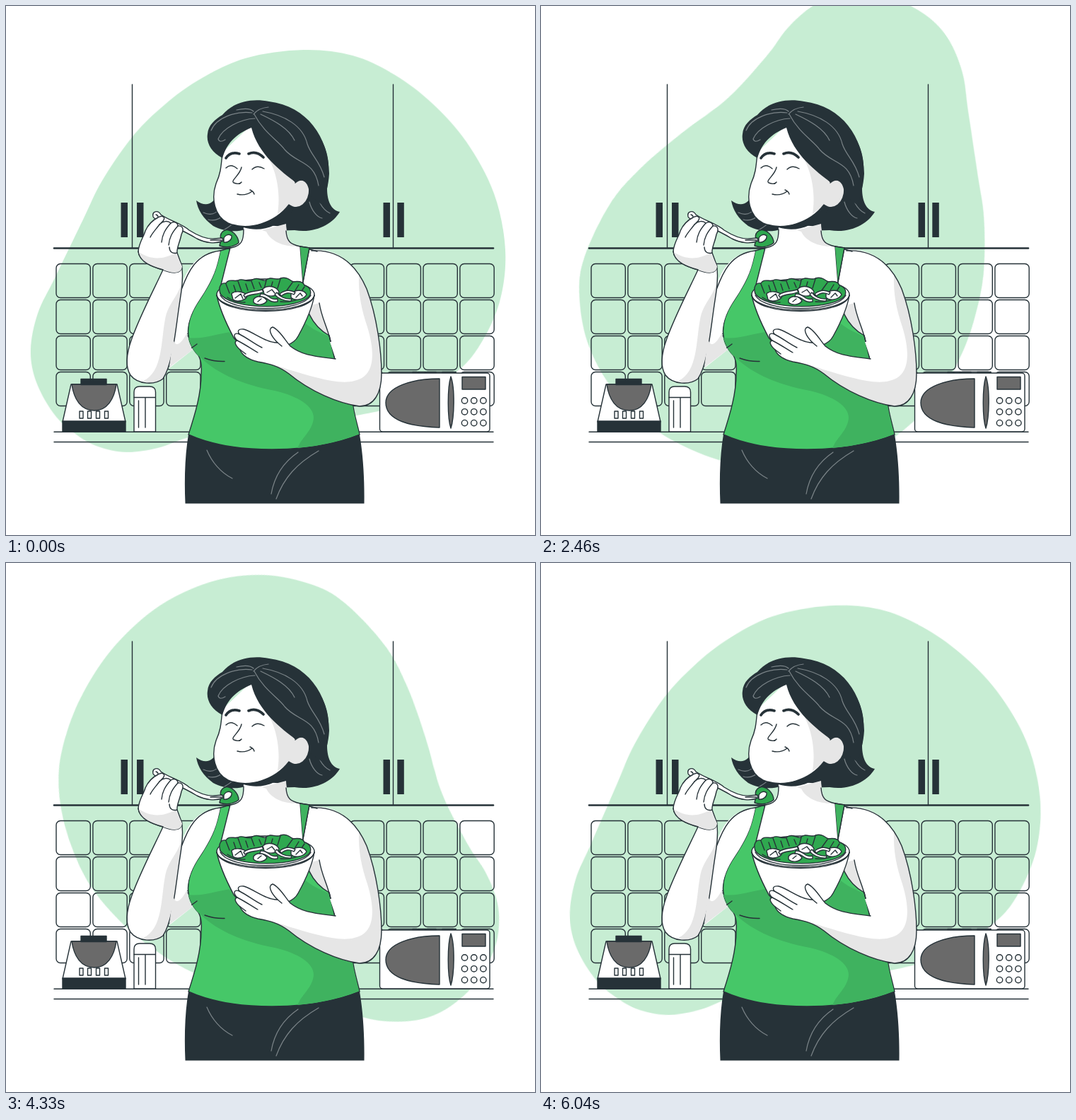
An HTML page for the animation above (6080 ms loop, 748 by 748 pixels).

```html
<!DOCTYPE html>
<html lang="en">
<head>
<meta charset="utf-8">
<title>Kitchen salad</title>
<style>
  html, body { margin: 0; width: 100%; height: 100%; overflow: hidden; background: #fff; }
  svg { display: block; width: 100vw; height: 100vh; }
  #blob { fill: #c7edd3; transform-origin: 373px 349px; animation: spin 6080ms linear infinite; }
  @keyframes spin { to { transform: rotate(360deg); } }
  .ink { stroke: #263238; stroke-width: 1.4; stroke-linecap: round; stroke-linejoin: round; }
  .line { fill: none; }
  .white { fill: #fff; }
  .dark { fill: #263238; }
  .gray { fill: #6a6a6a; }
  .shade { fill: #e6e6e6; }
  .green { fill: #46c768; }
  .deep { fill: #3fb25f; }
  .leaf { fill: #2fa84f; }
  .strand { fill: none; stroke: #7b8488; stroke-width: 1.2; stroke-linecap: round; }
</style>
</head>
<body>
<svg viewBox="0 0 748 748">
  <path id="blob"/>

  <!-- kitchen -->
  <g id="tiles" class="ink line"></g>
  <g class="ink line">
    <path d="M178.5 111V342M547.5 111V342M68 602.3H689M68 616.5H689"/>
    <path d="M68 342.5H689" stroke-width="2.6" style="stroke-width:2.6"/>
  </g>
  <path class="dark" d="M162.5 278h9.5v49h-9.5zM185 278h9.5v49H185zM533.5 278h9.5v49h-9.5zM553.3 278h9.5v49h-9.5z"/>

  <g class="ink">
    <path class="white" d="M92 535H157L169 588H80Z"/>
    <path class="gray" d="M93 535H156C153 556 143 572 125 572C106 572 96 556 93 535Z"/>
    <path class="dark" d="M106 527.5H142V535.5H106ZM80 587H169V602H80Z"/>
    <path class="white" d="M104 573h5v10h-5zM115.500 573h5v10h-5zM127.500 573h5v10h-5zM139.500 573h5v10h-5z"/>
    <path class="white" d="M181 602V546Q181 538 189 538H203Q211.500 538 211.500 546V602Z"/>
    <path class="line" d="M181 553.5H211M187.500 558V596M197 554V596"/>
    <rect class="white" x="528.5" y="519" width="155.500" height="83" rx="4"/>
    <path class="line" d="M575 517.7H608M617 517.7H636" style="stroke-width:2"/>
    <path class="gray" d="M613 527V596C572 595 537 586 537 561C537 538 575 527 613 527Z"/>
    <path class="gray" d="M629 524C635 540 634 582 629 597C624 582 624 540 629 524Z"/>
    <path class="gray" d="M645 524.500H678V542H645Z"/>
    <g id="knobs" class="white"></g>
  </g>

  <!-- hair behind -->
  <path class="dark" d="M269 275C281 284 294 282 299 264L335 300L338 316C326 320 308 319 293 311C279 301 271 288 269 275Z"/>
  <path class="dark" d="M350 250L440 180C462 210 456 240 454 258C454 276 460 289 472 291C462 308 438 322 408 317L340 319Z"/>
  <path class="strand" d="M279 292C290 297 298 293 303 285M286 302C296 305 304 300 310 294M309 316C314 313 318 311 321 307"/>
  <path class="strand" d="M429 277C432 289 440 299 447 300M437 256C439 273 447 288 458 293"/>

  <!-- torso -->
  <path class="white" d="M336 308C336 332 332 341 303 346L290 420L300 470H440L466 505L505 564L531 520C531 490 525 440 510 400C495 365 470 342 430 344L415 340C402 337 398 333 396 312Z"/>
  <path class="shade" d="M362 317L396 308C397 333 402 338 415 340C395 341 375 334 368 319Z"/>
  <path class="shade" d="M425 425L443 420C447 440 455 453 457 468C444 462 432 452 422 440Z"/>
  <path class="ink line" d="M336 316C336 332 333 339 318 342M396 318C397 333 402 337 416 340M429 344L440 347"/>
  <g class="ink">
    <path class="green" d="M303 346L317 342L304 394L316 440H415L420 392L416 340L429 342L420 390C420 425 432 452 457 466L466 503L490 560C492 577 497 592 500 606C430 634 320 634 258 606C268 575 276 548 276 520C277 510 276 501 272 494C252 473 254 447 270 421C290 391 297 377 303 346Z"/>
  </g>
  <path class="deep" d="M258 469C280 472 302 462 320 461L418 444C428 454 440 460 456 467L465 503L489 560C492 577 496 592 499 605C474 615 444 622 412 625C419 609 434 600 435 582C435 566 414 552 380 544C332 535 298 519 275 497C266 490 261 480 258 469Z"/>
  <path class="deep" d="M416 341L429 342L420 390L422 410H414L420 391Z"/>
  <path class="ink line" d="M281 498Q295 503 309 502.500M416 340L429 342L420 390M457 466L465 500"/>
  <path class="dark" d="M258 606C320 634 430 634 500 606C505 635 507 670 506.500 703.500H253.500C252 670 253 635 258 606Z"/>
  <path class="strand" d="M284 628C291 645 304 660 320 668M413 631C391 646 379 667 375 690M442 629C411 647 393 667 382 697"/>

  <!-- raised arm -->
  <path class="white" d="M303 346C297 377 290 391 270 421C254 447 252 473 264 486L231 512L247 400C253 378 266 349 303 346Z"/>
  <path class="ink line" d="M303 346C268 350 257 377 248 401M270 478C258 488 241 494 231 510"/>
  <path class="white" d="M222 373C209 401 190 437 178 470C170 492 169 511 176 522C187 536 211 536 222 527C235 508 239 465 244 430C247 407 250 392 249 374L240 352Z"/>
  <path class="shade" d="M249 388C246 408 229 420 225 443C219 473 222 518 194 530C204 535 217 533 222 527C235 508 239 465 244 430Z"/>
  <path class="ink line" d="M222 373C209 401 190 437 178 470C170 492 169 511 176 522C187 536 211 536 222 527C235 508 239 465 244 430C247 407 251 392 249 370"/>
  <path class="shade" d="M236 470L231 511L264 486C258 479 256 470 256 462C250 474 240 487 236 470Z"/>

  <!-- bowl and salad -->
  <g class="ink">
    <path class="white" d="M298 409C302 428 313 452 322 469C330 480 347 485 367 485C388 485 407 479 413 467C424 447 433 427 436 409Z"/>
    <ellipse class="white" cx="367" cy="408" rx="69" ry="22"/>
    <path class="leaf" d="M303 407C300 398 303 391 311 392C315 385 322 390 328 388C335 384 340 391 347 388C355 382 361 389 367 388C375 381 382 389 388 385C397 382 402 388 406 390C413 389 420 389 422 395C430 397 432 403 430 409C417 430 320 431 303 407Z"/>
    <path class="line" d="M311 393L316 406M328 389L333 403M322 395L325 404M347 389L351 400M339 393L342 402M368 388L365 400M358 391L361 398M388 386L384 399M377 390L375 397M405 391L397 402M414 394L409 402M422 397L416 406M313 412Q325 420 338 419M388 418Q405 420 421 411"/>
    <path class="white" d="M319 407C323 402 337 403 341 410C339 417 326 419 321 415Z"/>
    <path class="white" d="M363 400C370 394 382 396 386 404C385 411 371 412 365 407Z"/>
    <path class="white" d="M403 407C409 400 422 401 425 408C421 416 407 417 403 412Z"/>
    <path class="white" d="M350 415C354 409 365 409 369 417C364 424 354 423 350 419Z"/>
    <path class="white" d="M336 409C343 402 355 404 362 401L364 404C355 409 346 406 338 412ZM383 405C387 411 395 415 404 414L403 417C392 418 383 412 380 408ZM360 407C372 406 372 417 384 414L384 418C371 421 369 409 359 411ZM387 407C395 401 402 401 409 405L407 408C400 404 395 406 389 410Z"/>
    <path class="line" d="M324 413L332 407L335 414M369 405L376 401L380 406M410 412L416 406L419 410M356 418L361 414"/>
    <path class="line" d="M298 409C304 439 430 439 436 409M303 409C316 434 418 434 431 409"/>
  </g>

  <!-- holding arm -->
  <path class="white" d="M466 499C430 495 416 492 402 481C395 473 386 457 377 454C370 456 374 466 384 476C369 477 350 461 336 457C328 456 327 460 330 464C323 461 320 466 327 473C322 474 324 480 331 486C334 494 344 500 356 503C372 506 384 508 400 520C430 545 470 562 500 566C520 566 531 548 531 520L505 470L458 475Z"/>
  <path class="shade" d="M499 380C498 408 503 430 511 454C520 483 522 512 506 524C483 541 441 526 399 514C387 509 373 507 363 504C379 507 386 510 400 520C430 545 470 562 500 566C520 566 531 548 531 520C531 490 525 440 510 400Z"/>
  <path class="ink line" d="M432 346C470 344 495 365 510 400C525 440 531 490 531 520C531 548 520 566 500 566C470 562 430 545 400 520C384 508 372 506 356 503C344 500 334 494 331 486C324 480 322 474 327 473C320 466 323 461 330 464C327 460 328 456 336 457C350 461 369 477 384 476C374 466 370 456 377 454C386 457 395 473 402 481C416 492 430 495 466 499"/>
  <path class="ink line" d="M330 464C342 470 351 478 362 483M327 473C339 479 347 485 356 490M331 486L339 492M384 476L390 481M443 420C446 440 453 451 457 467"/>

  <!-- head -->
  <path class="dark" d="M320 306C345 321 378 321 405 290L410 277L380 270Z"/>
  <path class="white" d="M306 207C304 230 303 238 297 251C290 271 294 297 314 307C344 319 381 306 400 281C414 291 429 279 429 258C428 245 416 243 409 250L380 215L347 168Z"/>
  <path class="shade" d="M371 215C385 239 388 271 384 294C391 289 396 285 400 281C414 291 429 279 429 258C428 245 416 243 409 250L378 215Z"/>
  <path class="ink line" d="M306 207C304 230 303 238 297 251C290 271 294 297 314 307C344 319 381 306 400 281C414 291 429 279 429 258C428 245 416 243 409 250M311 229Q318 222 327 230M348 231Q355 224 365 230M333 228C331 239 317 247 322 250C327 252 331 252 333 249M327 266Q339 269 348 262M345 260Q350 262 351 266"/>
  <path class="ink line" d="M311 215Q318 205 330 209M343 209Q354 204 364 214" style="stroke-width:3.600"/>
  <path class="dark" d="M347 172C325 181 312 194 306 215C290 207 283 193 285 181C286 168 296 160 306 154C321 136 346 130 372 135C426 142 456 185 457 237C456 254 452 266 448 282L429 268C429 246 416 243 409 249C390 234 357 211 347 172Z"/>
  <path class="strand" d="M348 151C325 148 297 158 290 176M352 159C331 160 306 173 300 188Q302 194 310 189M350 153C354 148 360 144 371 143M350 149C346 145 339 144 326 147M351 153C365 180 386 191 394 203C412 224 436 218 442 254M360 153C379 162 400 173 408 190M363 149C393 154 420 169 426 195C431 211 444 219 450 242"/>

  <!-- fork, bite and hand -->
  <g class="ink">
    <path class="leaf" d="M304 329C301 321 309 315 315 317C323 319 329 328 329 335C322 341 310 342 302 339Z"/>
    <path class="white" d="M308 331C307 325 315 321 319 325C320 331 313 335 308 334Z"/>
    <path class="white" d="M208 298C206 290 215 288 219 295C232 304 247 307 259 317C270 324 284 330 295 329L306 328L307 332C296 337 282 335 270 329C257 321 244 315 231 309C220 303 211 304 208 298Z"/>
    <path class="line" d="M289 331L305 331M212 295Q216 296 215 301"/>
    <path class="white" d="M222 373C203 368 188 360 187 347C188 334 195 326 197 318C201 309 207 303 215 299C222 295 226 299 222 304L217 309C222 304 229 303 233 307C238 304 243 306 243 311C250 310 252 316 248 323C246 334 241 342 242 349L249 368C248 380 234 378 222 373Z"/>
  </g>
  <path class="shade" d="M188 348C203 358 220 360 240 349L249 368C248 380 234 378 222 373C203 368 190 361 188 348Z"/>
  <path class="ink line" d="M217 309C211 317 206 322 204 327M233 307C225 316 221 323 220 334M243 311C235 320 231 327 230 338M242 349C235 351 231 347 231 341M187 347C188 360 203 368 222 373"/>
</svg>
<script>
  const add = (id, markup) => { document.getElementById(id).innerHTML += markup; };

  for (const col of [0, 1, 2, 3, 8, 9, 10, 11])
    for (let row = 0; row < 4; row++)
      add('tiles', `<rect x="${71 + col * 51.9}" y="${364.5 + row * 51}" width="48.3" height="48" rx="6"/>`);

  for (let i = 0; i < 9; i++)
    add('knobs', `<circle cx="${648.5 + i % 3 * 13.2}" cy="${558 + Math.floor(i / 3) * 15.8}" r="4.2"/>`);

  // Closed smooth curve through the given points.
  function smooth(pts) {
    const at = i => pts[(i + pts.length) % pts.length];
    let d = `M${pts[0]}`;
    pts.forEach((p, i) => {
      const prev = at(i - 1), next = at(i + 1), after = at(i + 2);
      const a = p.map((v, k) => v + (next[k] - prev[k]) / 6);
      const b = next.map((v, k) => v - (after[k] - p[k]) / 6);
      d += `C${a} ${b} ${next}`;
    });
    return d + 'Z';
  }

  document.getElementById('blob').setAttribute('d', smooth([
    [420, 62], [490, 70], [549, 97], [602, 137], [651, 192], [690, 265],
    [706, 345], [698, 418], [669, 481], [632, 521], [560, 562], [495, 579],
    [420, 587], [340, 591], [262, 609], [215, 625], [170, 631], [130, 623],
    [98, 605], [68, 577], [43, 532], [35, 487], [45, 435], [70, 383],
    [110, 300], [136, 247], [177, 187], [218, 145], [270, 106], [338, 74]
  ]));
</script>
</body>
</html>
```
